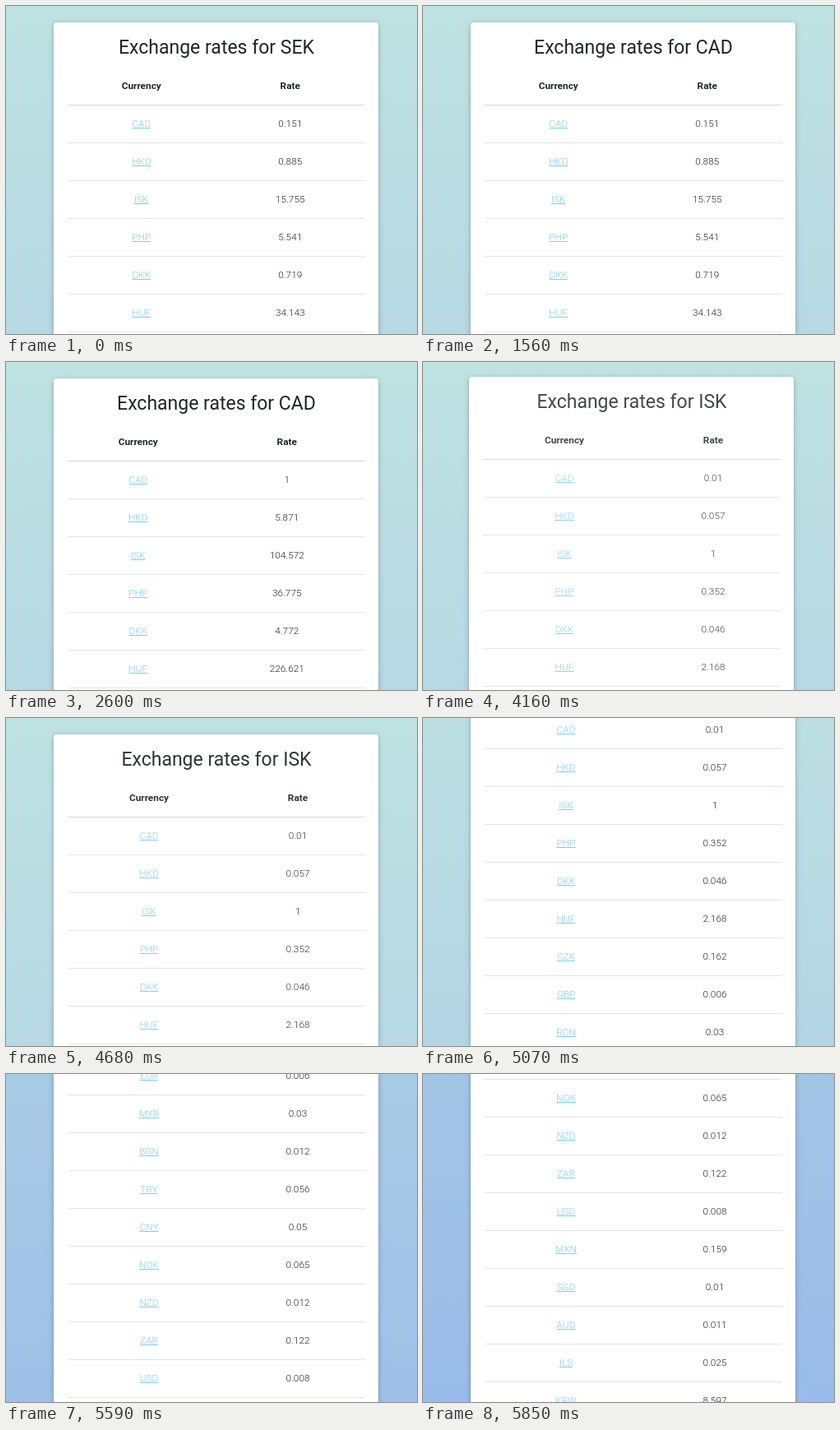
These frames come from a looping animation (500 px wide and 399 px high, 7.54 s). An HTML page:

```html
<!DOCTYPE html>
<html lang="en">
<head>
<meta charset="utf-8">
<title>Exchange rates</title>
<style>
html, body { margin: 0; width: 100%; height: 100%; overflow: hidden; }
#stage { position: relative; width: 500px; height: 399px; overflow: hidden; }
#page {
  position: absolute; top: 0; left: 0; width: 500px; height: 1680px;
  background: linear-gradient(#bfe2e2, #b6d8e3 24%, #a8cbe5 56%, #97b9e9);
  font-family: Roboto, Arial, sans-serif; color: #212529;
}
#card {
  position: absolute; left: 58px; top: 20px; width: 395px; height: 1634px;
  background: #fff; border-radius: 3.5px;
  box-shadow: 0 1.6px 4px rgba(0,0,0,.16), 0 1.6px 8px rgba(0,0,0,.12);
}
#content { width: 362px; margin-left: 17px; text-align: center; font-size: 11.83px; }
h3 { margin: 0; height: 54px; font: 400 23px/62px Roboto, Arial, sans-serif; white-space: nowrap; }
.row {
  display: grid; grid-template-columns: var(--split) 1fr; box-sizing: border-box;
  height: 46px; line-height: 45px; border-top: 1px solid #e1e4e6; font-weight: 300;
}
.head { border-top: 0; line-height: 46px; font-weight: 700; }
.head + .row { border-top-color: #d3d7da; }
.link { color: #80cbe8; text-decoration: underline; }
</style>
</head>
<body>
<div id="stage"><div id="page"><div id="card"><div id="content">
  <h3>Exchange rates for <span id="base">SEK</span></h3>
  <div class="row head"><span>Currency</span><span>Rate</span></div>
</div></div></div></div>
<script>
const LOOP = 7540, STEP = 130;
const codes = ('CAD HKD ISK PHP DKK HUF CZK GBP RON SEK IDR INR BRL RUB HRK JPY THB ' +
  'CHF EUR MYR BGN TRY CNY NOK NZD ZAR USD MXN SGD AUD ILS KRW PLN').split(' ');
const tables = {
  SEK: { split: 179.5, rates: '0.151 0.885 15.755 5.541 0.719 34.143' },
  CAD: { split: 171.5, rates: '1 5.871 104.572 36.775 4.772 226.621' },
  ISK: { split: 198, rates: '0.01 0.057 1 0.352 0.046 2.168 0.162 0.006 0.03 0.064 106.08 ' +
    '0.538 0.041 0.542 0.047 0.771 0.228 0.007 0.006 0.03 0.012 0.056 0.05 0.065 0.012 ' +
    '0.122 0.008 0.159 0.01 0.011 0.025 8.597 0.028' }
};
const $ = id => document.getElementById(id);
const page = $('page'), card = $('card'), content = $('content'), base = $('base');

const cells = codes.map(code => {
  const row = document.createElement('div');
  row.className = 'row';
  row.innerHTML = `<span><span class="link">${code}</span></span><span></span>`;
  content.append(row);
  return row.lastChild;
});

let shown;
function showTable(name) {
  if (name === shown) return;
  shown = name;
  const { split, rates } = tables[name];
  const list = rates.split(' ');
  content.style.setProperty('--split', split + 'px');
  cells.forEach((cell, i) => cell.textContent = list[i] || '');
}

const clamp = x => Math.min(1, Math.max(0, x));
const ease = x => x * x * (3 - 2 * x);

function draw(t) {
  base.textContent = t < 1560 ? 'SEK' : t < 4160 ? 'CAD' : 'ISK';
  showTable(t < 1690 ? 'SEK' : t < 4160 ? 'CAD' : 'ISK');

  // New rates nudge the card and fade in
  const age = t < 1690 ? Infinity : t - (t < 4160 ? 1690 : 4160);
  const shift = Math.min(0, age / STEP - 2);
  card.style.transform = `translate(${shift}px, ${shift}px)`;
  content.style.opacity = 0.84 + 0.16 * clamp(age / 910);

  const scroll = Math.round(1172 * ease(clamp((t - 4867) / 983)));
  page.style.transform = `translateY(${-scroll}px)`;
}

const start = performance.now();
let last = -1;
function tick() {
  const t = (performance.now() - start) % LOOP;
  const step = Math.floor(t / STEP);
  if (step !== last) draw((last = step) * STEP);
  requestAnimationFrame(tick);
}
tick();
</script>
</body>
</html>
```
